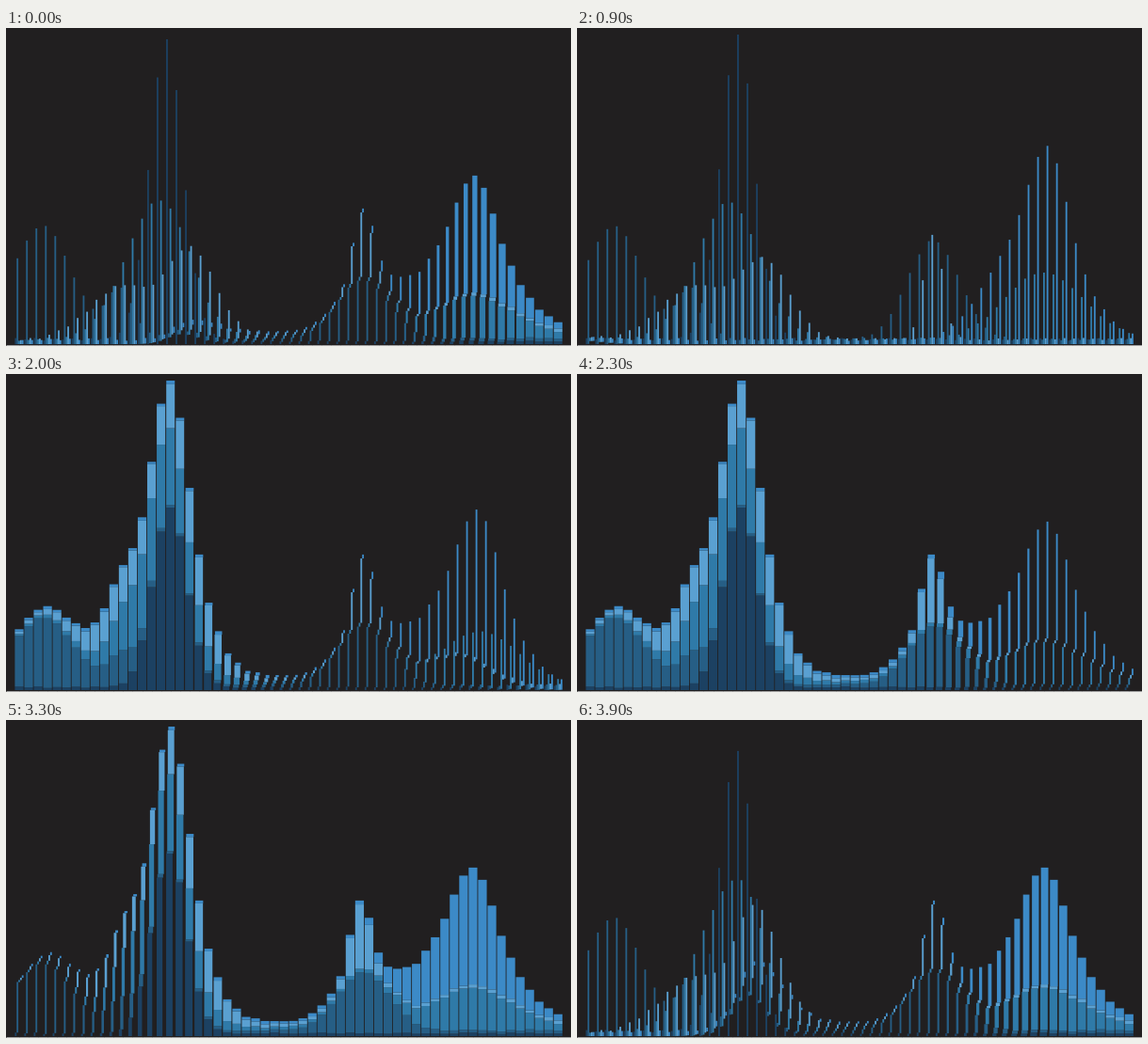
Write a matplotlib script that moves like this. It is 600x338 px and loops after 4000 ms.

```python
import numpy as np
import matplotlib.pyplot as plt
from matplotlib.animation import FuncAnimation
from matplotlib.collections import LineCollection, PolyCollection

W, H = 600, 338
FRAMES, INTERVAL = 40, 100
COLS, LAYERS = 58, 5
BASE, TALLEST = 336, 329
LEFT, PITCH, BAND = 9.4, 10.04, 9.2
THIN = BAND / LAYERS

# Timing in ms: each regrouping runs in two chained phases, staggered by column
CYCLE, HALF = 4000, 2000
GROUP_START, PHASE, STAGGER = 2750, 500, 20
CLOCK_STEP, CLOCK_LAG = 100.6, 35

BACKGROUND = "#211f20"
COLORS = ["#1c4162", "#265e85", "#2f7aa8", "#5aa0d1", "#3c8ac7"]

# Bumps of each layer: (height, centre column, width)
BUMPS = [
    [(325, 15.94, 2.53)],
    [(121, 2.6, 4.4), (51, 10.9, 2.06), (106, 36.45, 3.88)],
    [(146, 14.6, 4.75), (72, 48, 5.77)],
    [(57, 10.8, 4.87), (82, 18.3, 3.7), (113.5, 36.09, 1.4)],
    [(159, 48.15, 2.95), (85, 44, 4.4), (38, 52, 3.5)],
]


def ease(t):
    """Cubic in-out, clamped to 0..1."""
    t = np.clip(t, 0, 1)
    return np.where(t < 0.5, 4 * t**3, 1 - 4 * (1 - t) ** 3)


def mix(a, b, k):
    return a + (b - a) * k


def make_data():
    rng = np.random.default_rng(4)
    col = np.arange(COLS)
    data = rng.uniform(3.6, 6.6, (LAYERS, COLS))
    for row, bumps in zip(data, BUMPS):
        for height, centre, width in bumps:
            row += height * np.exp(-(((col - centre) / width) ** 2))
    return data


data = make_data()
totals = np.cumsum(data, axis=0)
group_h = data * TALLEST / data.max()
stack_scale = TALLEST / totals[-1].max()
stack_h = data * stack_scale
stack_y = BASE - totals * stack_scale
group_y = BASE - group_h

cols = np.arange(COLS)
stack_x = np.tile(LEFT + cols * PITCH, (LAYERS, 1))
group_x = stack_x + THIN * np.arange(LAYERS)[:, None]


def progress(t):
    """How far each column is towards grouped: (sideways, vertical)."""
    t = (t - GROUP_START - STAGGER * cols) % CYCLE
    back = t - HALF
    side = ease(t / PHASE) - ease((back - PHASE) / PHASE)
    rise = ease((t - PHASE) / PHASE) - ease(back / PHASE)
    return side, rise


def bar_polygons(t):
    side, rise = progress(t)
    x0 = mix(stack_x, group_x, side)
    x1 = x0 + mix(BAND, THIN, side)
    y0 = mix(stack_y, group_y, rise)
    y1 = y0 + mix(stack_h, group_h, rise)
    corners = [(x0, y0), (x1, y0), (x1, y1), (x0, y1)]
    polys = np.stack([np.stack(c, axis=-1) for c in corners], axis=2)
    return polys.reshape(-1, 4, 2)


fig = plt.figure(figsize=(W / 100, H / 100), dpi=100, facecolor=BACKGROUND)
ax = fig.add_axes([0, 0, 1, 1])
ax.set_xlim(0, W)
ax.set_ylim(H, 0)
ax.axis("off")

bars = PolyCollection(bar_polygons(0), facecolors=np.repeat(COLORS, COLS),
                      edgecolors="none", linewidths=0)
bars.set_snap(False)
ax.add_collection(bars, autolim=False)

# Baseline with one tick per column
px = 72 / fig.dpi
ax.plot([0, W], [BASE + 0.5] * 2, color="#a3a3a3", lw=px,
        solid_capstyle="butt", zorder=3)
centres = LEFT + BAND / 2 + cols * PITCH
ticks = LineCollection([[(x, BASE + 1), (x, H)] for x in centres],
                       colors="#8a8a8a", linewidths=px, zorder=3)
ax.add_collection(ticks, autolim=False)


def draw(frame):
    bars.set_verts(bar_polygons(frame * CLOCK_STEP - CLOCK_LAG))
    return (bars,)


anim = FuncAnimation(fig, draw, frames=FRAMES, interval=INTERVAL,
                     repeat=True, repeat_delay=0, blit=False)
plt.show()
```
